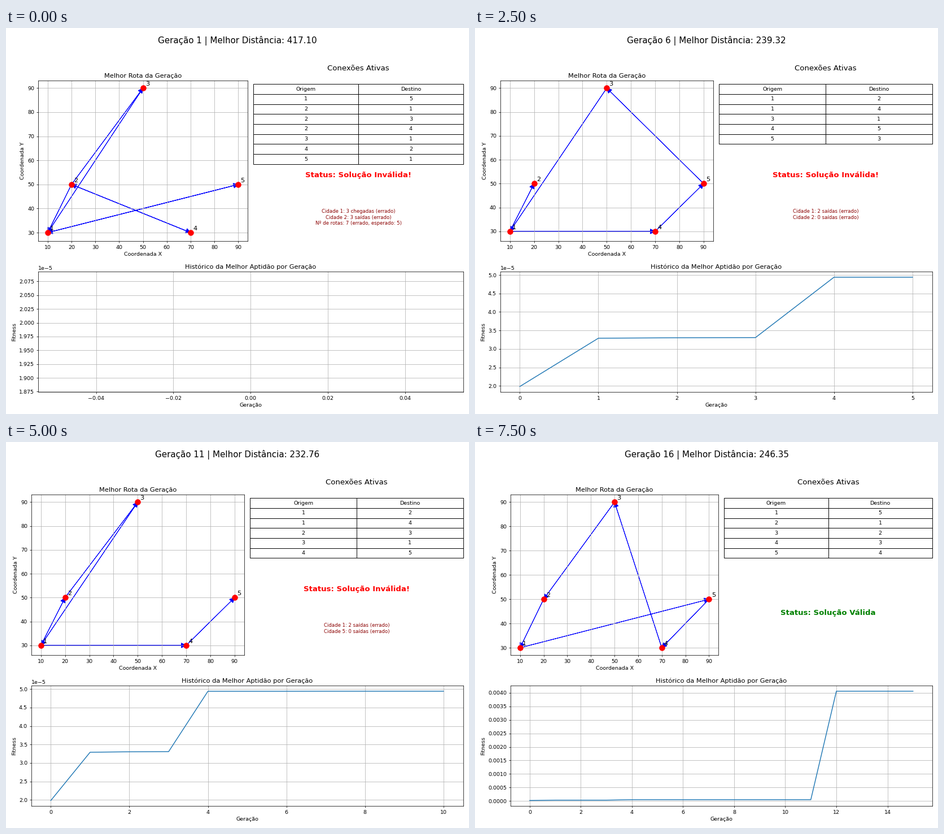
Animation, 820 px wide and 683 px high, one loop 8000 ms. Source, as a matplotlib script:

```python
import math

import matplotlib.pyplot as plt
from matplotlib.animation import FuncAnimation

W, H, DPI = 820, 683, 820 / 12
CITIES = {1: (10, 30), 2: (20, 50), 3: (50, 90), 4: (70, 30), 5: (90, 50)}

# (generations it stays, routes as "origin destination" pairs, penalty count)
STAGES = [
    (1, "15 21 23 24 31 42 51", 5),
    (1, "15 23 24 31 42 51", 3),
    (1, "12 14 35 43 51", 3),
    (1, "12 14 31 45 53", 3),
    (3, "12 14 31 45 53", 2),
    (4, "12 14 23 31 45", 2),
    (1, "12 14 21 45 53", 2),
    (4, "15 21 32 43 54", 0),
]


def length(routes):
    return sum(math.dist(CITIES[a], CITIES[b]) for a, b in routes)


best, history = [], []
for count, text, penalty in STAGES:
    routes = [(int(p[0]), int(p[1])) for p in text.split()]
    best += [routes] * count
    history += [1 / (length(routes) + 10000 * penalty)] * count


def find_errors(routes):
    errors = []
    for c in CITIES:
        for side, word in ((1, "chegadas"), (0, "saídas")):
            n = sum(r[side] == c for r in routes)
            if n != 1:
                errors.append(f"Cidade {c}: {n} {word} (errado)")
    if len(routes) != len(CITIES):
        errors.append(f"Nº de rotas: {len(routes)} (errado, esperado: {len(CITIES)})")
    return errors


def add_axes(left, top, right, bottom):
    """Axes from pixel edges, y counted from the top."""
    return fig.add_axes([left / W, 1 - bottom / H, (right - left) / W, (bottom - top) / H])


def draw_map(ax, routes):
    for a, b in routes:
        (x, y), (u, v) = CITIES[a], CITIES[b]
        ax.arrow(x, y, u - x, v - y, head_width=2, head_length=2,
                 length_includes_head=True, fc="blue", ec="blue")
    for c, (x, y) in CITIES.items():
        ax.plot(x, y, "ro", markersize=10)
        ax.text(x + 1, y + 1, str(c), fontsize=12)
    ax.set_title("Melhor Rota da Geração")
    ax.set_xlabel("Coordenada X")
    ax.set_ylabel("Coordenada Y")
    ax.grid(True)


def draw_table(ax, routes):
    ax.axis("off")
    ax.set_title("Conexões Ativas", fontsize=14, pad=20)
    table = ax.table(cellText=routes, colLabels=["Origem", "Destino"],
                     cellLoc="center", loc="upper center")
    table.auto_set_font_size(False)
    table.set_fontsize(10)
    for cell in table.get_celld().values():
        cell.set_height(0.0625)

    errors = find_errors(routes)
    status = dict(ha="center", fontsize=14, weight="bold", transform=ax.transAxes)
    if errors:
        ax.text(0.5, 0.4, "Status: Solução Inválida!", color="red", **status)
        ax.text(0.5, 0.2, "\n".join(errors), color="darkred", fontsize=9,
                ha="center", va="top", transform=ax.transAxes)
    else:
        ax.text(0.5, 0.25, "Status: Solução Válida", color="green", **status)


def draw_history(ax, values):
    ax.plot(values)
    ax.set_title("Histórico da Melhor Aptidão por Geração")
    ax.set_xlabel("Geração")
    ax.set_ylabel("Fitness")
    ax.grid(True)


def update(i):
    fig.clear()
    routes, values = best[i], history[:i + 1]
    fig.suptitle(f"Geração {i + 1} | Melhor Distância: {length(routes):.2f}", fontsize=16)

    # the left edge follows the width of the fitness tick labels
    left = 57 if i == 0 else 63 if values[-1] > 1e-3 else 44.6
    right, gap = 809.7, 10.25
    width = (right - left - gap) / 2
    draw_map(add_axes(left, 93.5, left + width, 377), routes)
    draw_table(add_axes(right - width, 93.5, right, 377), routes)
    draw_history(add_axes(left, 431.3, right, 644), values)
    return []


fig = plt.figure(figsize=((W + 1e-6) / DPI, (H + 1e-6) / DPI), dpi=DPI)
anim = FuncAnimation(fig, update, frames=len(best), interval=500, repeat=True,
                     repeat_delay=0, blit=False)
plt.show()
```
